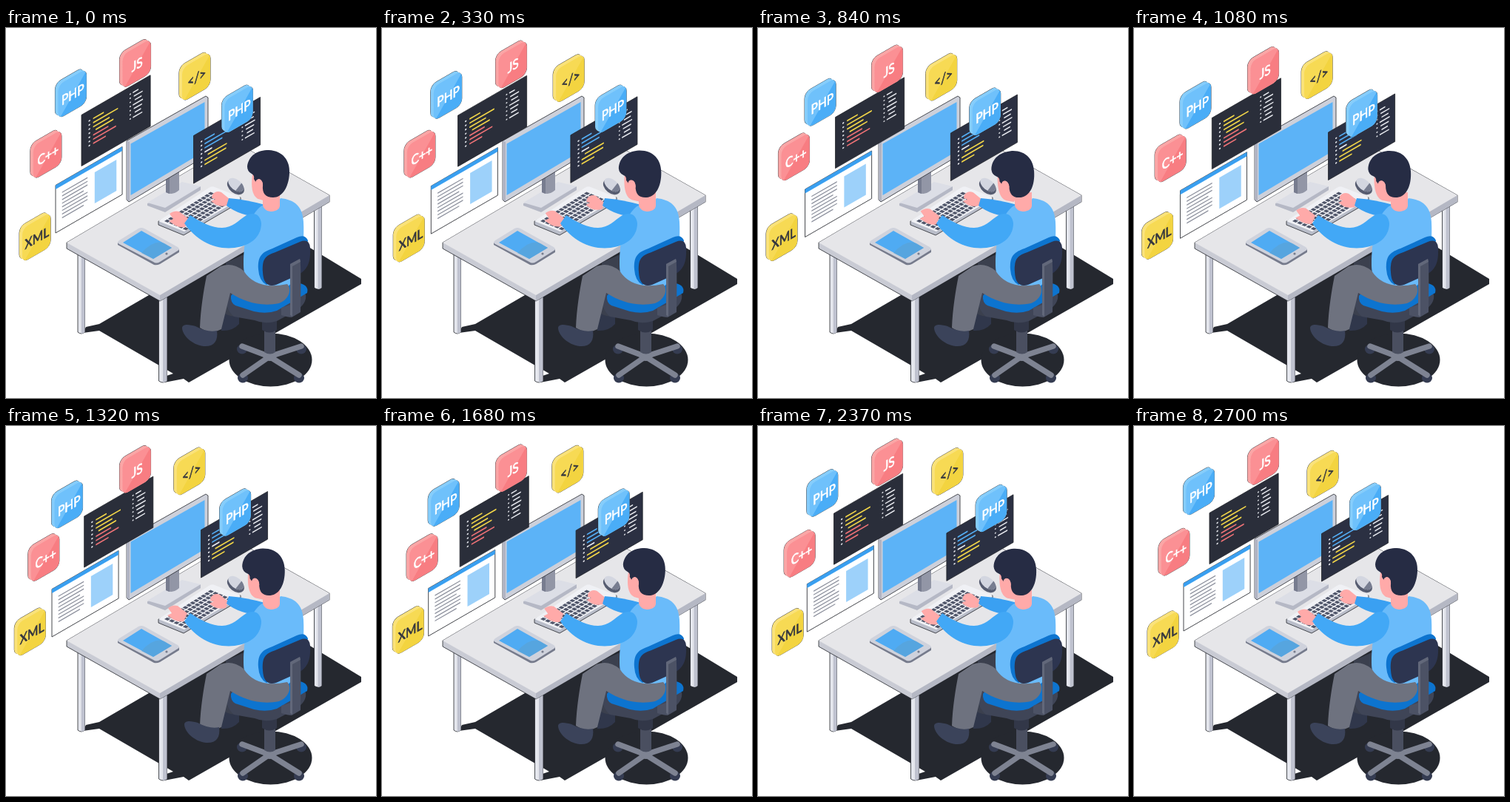
Write an HTML page that moves like this. It is 500x500 px and loops after 2760 ms.

```html
<!DOCTYPE html>
<html lang="en">
<head>
<meta charset="utf-8">
<title>Programmer at a desk</title>
<style>
html, body { margin: 0; width: 100%; height: 100%; overflow: hidden; background: #fff; }
svg { display: block; width: 100vw; height: 100vh; }
text { font: 18px Lato, "Open Sans", sans-serif; text-anchor: middle; stroke-width: .7px; }
.edge { stroke: #24262c; stroke-width: .8; stroke-linejoin: round; }
</style>
</head>
<body>
<svg viewBox="0 0 500 500">
  <defs id="defs"></defs>
  <g id="floor">
    <path fill="#25282f" d="M104 412L108 404 126 400 358 265 480 339V346L247 479 240 474 214 479V471L226 467 126 409Z"/>
    <ellipse cx="357.500" cy="448.500" rx="56" ry="36" fill="#25282f"/>
  </g>
  <g id="desk"></g>
  <g id="monitor">
    <path fill="#b5b8c5" d="M191 237V240L215 249 263 219V214Z"/>
    <path fill="#dcdee6" d="M191 236L238 208 263 214 215 243Z"/>
    <path fill="#9296a6" d="M216 200L234 190V219Q225 227 216 222Z"/>
    <path fill="#777c8f" d="M216 200L221 198V224L216 222Z"/>
    <path class="edge" fill="#cdd0da" d="M163 152.500L270 92 273 94V171L166 235 163 232Z"/>
    <path fill="#b1b4c3" d="M163 152.500L167 154V234L163 232Z"/>
    <path fill="#5cb3f7" d="M168.500 156.500L268.500 100V166.500L168.500 226Z"/>
  </g>
  <g id="back"></g>
  <g id="things">
    <path fill="#767b8c" d="M151 290V293L200 320Q204 321 208 319L234 303V299Z"/>
    <path fill="#cfd2dc" d="M153 287L179 271Q183 269 187 271L232 296Q236 299 232 301L208 316Q203 319 199 316L153 292Q149 290 153 287Z"/>
    <path fill="#4fabf3" d="M158 290L183 274 224 297 199 312Z"/>
    <path fill="#5ba3d8" d="M183 304Q200 285 214 291L224 297 199 312Z" opacity=".7"/>
    <circle cx="217" cy="305" r="1.600" fill="#777c8c"/>
    <path class="edge" fill="#b9bdc9" d="M206 261V266L240 280 317 235V229Z"/>
    <path fill="#f0f1f5" d="M206 261L274 216Q278 213 282 215L315 228Q318 230 315 232L241 275Z"/>
    <g id="keys" fill="#50566a"></g>
    <g transform="rotate(38 311 214)">
      <ellipse cx="311" cy="215" rx="13" ry="8.500" fill="#565c70"/>
      <ellipse cx="309.500" cy="212.500" rx="12" ry="7" fill="#d3d6e0"/>
      <path fill="#777d90" d="M314 206A12 7 0 0 1 314 219Z"/>
    </g>
  </g>
  <g id="front"></g>
  <g id="person">
    <path fill="#3b404e" d="M297 317L324 305 328 347 314 352 315 390H293L298 350Z"/>
    <path fill="#30374b" d="M291 383Q303 392 315 389V400Q306 410 291 409Z"/>
    <path fill="#4a4f60" d="M349 380H364V438Q357 443 349 438Z"/>
    <path fill="#323748" d="M346 380H366V408Q356 415 346 408Z"/>
    <path fill="#3f4557" d="M298 362Q302 356 320 360L405 360Q407 372 392 382L366 396Q350 401 336 395L308 390Q296 380 298 362Z"/>
    <path fill="#0d74cf" d="M304 362Q310 353 328 352L392 344Q410 346 407 358L366 382Q352 387 335 383L310 375Q303 371 304 362Z"/>
    <g id="armR">
      <path fill="#ffaaa9" d="M279 225Q284 219 291 222L302 231 299 240Q290 242 284 239L277 234 283 231 278 230Z"/>
    </g>
    <path fill="#3aa0f2" d="M298 240L301 230Q325 232 350 239L343 255Q316 254 298 240Z"/>
    <path fill="#6abbfa" d="M346 240C330 250 321 280 321 320C321 338 328 347 342 352H378C396 340 404 300 402 262C401 241 390 232 371 230Q362 246 346 240Z"/>
    <path fill="#ffaaa9" d="M347 222H370V238Q371 247 358 248 349 247 347 240Z"/>
    <g id="armL">
      <path fill="#ffaaa9" d="M221 251Q227 246 234 248L247 258 242 269Q235 270 229 267L220 261 226 258Z"/>
    </g>
    <path fill="#42a8f6" d="M241 264L249 253C264 263 278 270 292 270C306 270 314 260 325 253C335 248 344 252 345 264C345 282 331 294 309 297C282 300 258 288 241 264Z"/>
    <path fill="#6e727f" d="M380 346C386 352 384 366 369 372C344 377 322 370 303 358L291 407Q277 415 262 405C263 380 267 355 271 335L290 322Q306 316 321 328 338 355 380 346Z"/>
    <path id="foot" fill="#3b435a" d="M238 405C239 399 249 401 256 403Q273 412 285 409C287 423 281 431 267 430 251 428 238 415 238 405Z"/>
    <path fill="#0d74cf" d="M341 326C340 308 346 303 360 298L393 283Q404 278 408 287L404 310 352 347Q342 342 341 326Z"/>
    <path fill="#2d3550" d="M347 330C346 312 350 308 364 303L397 289Q410 284 411 297C412 318 407 327 394 334L365 347Q348 352 347 330Z"/>
    <path fill="#4c5265" d="M384 319L397 312Q399 313 398 384L386 391Q381 391 372 388V378L384 374Z"/>
    <path fill="#62687a" d="M384 319L397 312 398 316 387 322V390L384 388Z"/>
    <g id="head">
      <path fill="#ffaaa9" d="M333 198C331 213 332 227 341 231L351 234 358 222V203Z"/>
      <path fill="#262c44" d="M326 187C328 172 340 165 355 165C375 166 384 180 383 196C382 216 373 229 361 229C351 229 346 224 347 212C347 203 339 202 338 209L335 204Q336 199 332 197 326 194 326 187Z"/>
      <ellipse cx="342" cy="211" rx="5" ry="7" fill="#ffaaa9" transform="rotate(-12 342 211)"/>
    </g>
    <g id="wheels"></g>
  </g>
</svg>
<script>
const $ = id => document.getElementById(id);
const iso = (x, y) => `transform="translate(${x} ${y}) matrix(.866 -.5 0 1 0 0)"`;
const put = (id, html) => $(id).insertAdjacentHTML('beforeend', html);
const poly = (fill, d, cls = '') => `<path class="${cls}" fill="${fill}" d="${d}"/>`;
const bar = (x, y, w, fill, h = 1.9) =>
  `<rect x="${x}" y="${y}" width="${w}" height="${h}" rx=".6" fill="${fill}"/>`;

// Desk
const leg = (x, top, bottom, w) =>
  poly('#e4e6ed', `M${x} ${top}H${x + w}V${bottom - 2}Q${x + w / 2} ${bottom + 2} ${x} ${bottom - 2}Z`, 'edge') +
  poly('#bfc2cf', `M${x + w * .5} ${top}H${x + w}V${bottom - 2}Q${x + w * .8} ${bottom} ${x + w * .5} ${bottom}Z`);
put('desk',
  leg(416.5, 238, 353, 10) + leg(97, 300, 413, 9.5) + leg(206.5, 362, 479, 11) +
  poly('#c9cbd4', 'M82 290V298L208 369 437 235V226L311 155Z', 'edge') +
  poly('#b5b8c4', 'M208 361V369L437 235V226Z') +
  poly('#e6e6e9', 'M82 290L311 155 437 226 208 361Z'));

// Keyboard keys
let keys = '';
for (let r = 0; r < 5; r++)
  for (let c = 0; c < 13; c++) {
    const x = 214 + c * 4.9 + r * 6.2, y = 261 - c * 3.1 + r * 2.6;
    keys += `M${x} ${y}l3.600 -2.300 4.600 1.900 -3.600 2.300z`;
  }
put('keys', `<path d="${keys}"/>`);

// Chair wheels
const ends = [[319, 430], [399, 430], [320, 469], [396, 469]];
put('wheels',
  ends.map(([x, y]) => `<ellipse cx="${x}" cy="${y + 4}" rx="7" ry="6.500" fill="#353c52"/>`).join('') +
  ends.map(([x, y]) => `<path d="M356 444L${x} ${y}" stroke="#7e8392" stroke-width="7.500" stroke-linecap="round"/>`).join('') +
  '<ellipse cx="356.500" cy="444" rx="9" ry="6" fill="#7e8392"/><path fill="#4a4f60" d="M349 428H364V438Q357 443 349 438Z"/>');

// Floating panels: each row is [start, length, colour]
const Y = '#f2d648', R = '#ee7276', B = '#54aef5', W = '#e9ebf0';
const code = (rows, w, h, fill) => {
  let s = `<rect class="edge" width="${w}" height="${h}" fill="${fill}"/>`;
  rows.forEach(([x, len, ink], i) => {
    const y = 13 + i * 5.6;
    s += bar(11, y, 2.6, W) + bar(x, y, len, ink);
  });
  for (let i = 0; i < 7; i++) {
    const y = 9 + i * 5.6;
    s += bar(75, y, 2.2, W, 1.7) + bar(80 + i % 3 * 1.5, y, 9 + i * 5 % 8, W, 1.7);
  }
  return s;
};
const panel = (layer, id, x, y, body) => put(layer, `<g id="${id}"><g ${iso(x, y)}>${body}</g></g>`);

panel('back', 'codeL', 102, 117.5, code(
  [[18, 17, Y], [18, 39, Y], [18, 26, Y], [22, 28, Y], [18, 24, R], [18, 36, R], [18, 20, R]], 107.5, 69, '#2a2e3a'));
panel('front', 'codeR', 253.5, 145.5, code(
  [[17, 16, B], [17, 36, B], [17, 28, B], [17, 12, W], [22, 30, Y], [17, 34, Y], [17, 20, Y]], 104, 64.5, '#2b3042'));

let page = '<rect class="edge" width="104" height="64.500" fill="#fff"/><rect width="104" height="5.500" fill="#399ff0"/>' +
  '<rect x="61" y="13" width="34" height="42" fill="#9dd1fa"/>';
for (let i = 0; i < 8; i++) page += bar(10, 14 + i * 4.9, i % 4 == 3 ? 34 : 40, '#8a8e9b', 1.4);
panel('back', 'page', 67, 212.5, page);

// Icon tiles: lit half, base half, side
const tints = {
  red: ['#fb9094', '#f87d82', '#faa6a6'],
  blue: ['#6fc1fb', '#4aadf7', '#86cdfb'],
  gold: ['#f7da54', '#f3d440', '#fae27a']
};
for (const [k, [light, base]] of Object.entries(tints))
  put('defs', `<linearGradient id="${k}" x2="1" y2="1"><stop stop-color="${light}"/>
    <stop offset=".52" stop-color="${light}"/><stop offset=".54" stop-color="${base}"/><stop offset="1" stop-color="${base}"/></linearGradient>`);

const tile = (layer, id, x, y, tint, label) => {
  const rect = (cx, cy, fill, cls = '') =>
    `<rect class="${cls}" x="-22" y="-23" width="44" height="46" rx="8.500" fill="${fill}" ${iso(cx, cy)}/>`;
  let s = rect(19.5, 30.7, tints[tint][2], 'edge') + rect(23.5, 33, tints[tint][2], 'edge');
  for (let i = 0; i < 5; i++) s += rect(19.5 + i, 30.7 + i * .58, tints[tint][2]);
  const ink = tint == 'gold' ? '#34363f' : '#fff';
  s += rect(23.5, 33, `url(#${tint})`) +
    `<text ${iso(24.3, 33.5)} y="6.500" fill="${ink}" stroke="${ink}">${label}</text>`;
  put(layer, `<g id="${id}"><g transform="translate(${x} ${y})">${s}</g></g>`);
};
tile('back', 'js', 153, 15.5, 'red', 'JS');
tile('back', 'phpL', 66, 56, 'blue', 'PHP');
tile('back', 'cpp', 31, 142, 'red', 'C++');
tile('back', 'xml', 14.3, 247.8, 'gold', 'XML');
tile('front', 'tag', 230, 31, 'gold', '&lt;/&gt;');
tile('front', 'phpR', 289.7, 81, 'blue', 'PHP');

// Motion
const STEP = 30, CYCLE = 2700, LOOP = 2760;
const wave = (t, peak) => Math.cos((t - peak) / CYCLE * 2 * Math.PI);
const swing = (t, n = 1) => (1 - Math.cos(t / CYCLE * 2 * Math.PI * n)) / 2;
const arc = (t, a, b) => t > a && t < b ? Math.sin((t - a) / (b - a) * Math.PI) : 0;
const move = (id, x, y, extra = '') => $(id).setAttribute('transform', `translate(${x} ${y})${extra}`);

// There-and-back drift: [dx, dy]
const drifts = { js: [0, 11], phpL: [-5, 18], codeL: [3.7, 4.5], codeR: [10, -5], page: [-5, 8] };
// Orbits: [rx, time of rightmost, ry, time of lowest]
const orbits = {
  cpp: [4, 2180, 4, 1520], xml: [4.3, 2400, 4.6, 470],
  tag: [4.4, 2420, 5, 470], phpR: [4.5, 2150, 4.2, 1520]
};

function draw(t) {
  const s = swing(t);
  for (const id in drifts) move(id, drifts[id][0] * s, drifts[id][1] * s);
  for (const id in orbits) {
    const [rx, px, ry, py] = orbits[id];
    move(id, rx * wave(t, px), ry * wave(t, py));
  }
  const nod = arc(t, 0, 1690) + .82 * arc(t, 1690, CYCLE);
  move('head', -5 * nod, 0, ` rotate(${-7 * nod} 360 235)`);
  move('armR', -2 * swing(t, 3), 6 * swing(t, 3));
  move('armL', -2 * s, -5 * s);
  const tap = arc(t, 1140, 1500);
  move('foot', 3 * tap, -2 * tap);
}

const start = performance.now();
function tick() {
  const t = (performance.now() - start) % LOOP;
  draw(Math.min(Math.floor(t / STEP) * STEP, CYCLE));
  requestAnimationFrame(tick);
}
tick();
</script>
</body>
</html>
```
